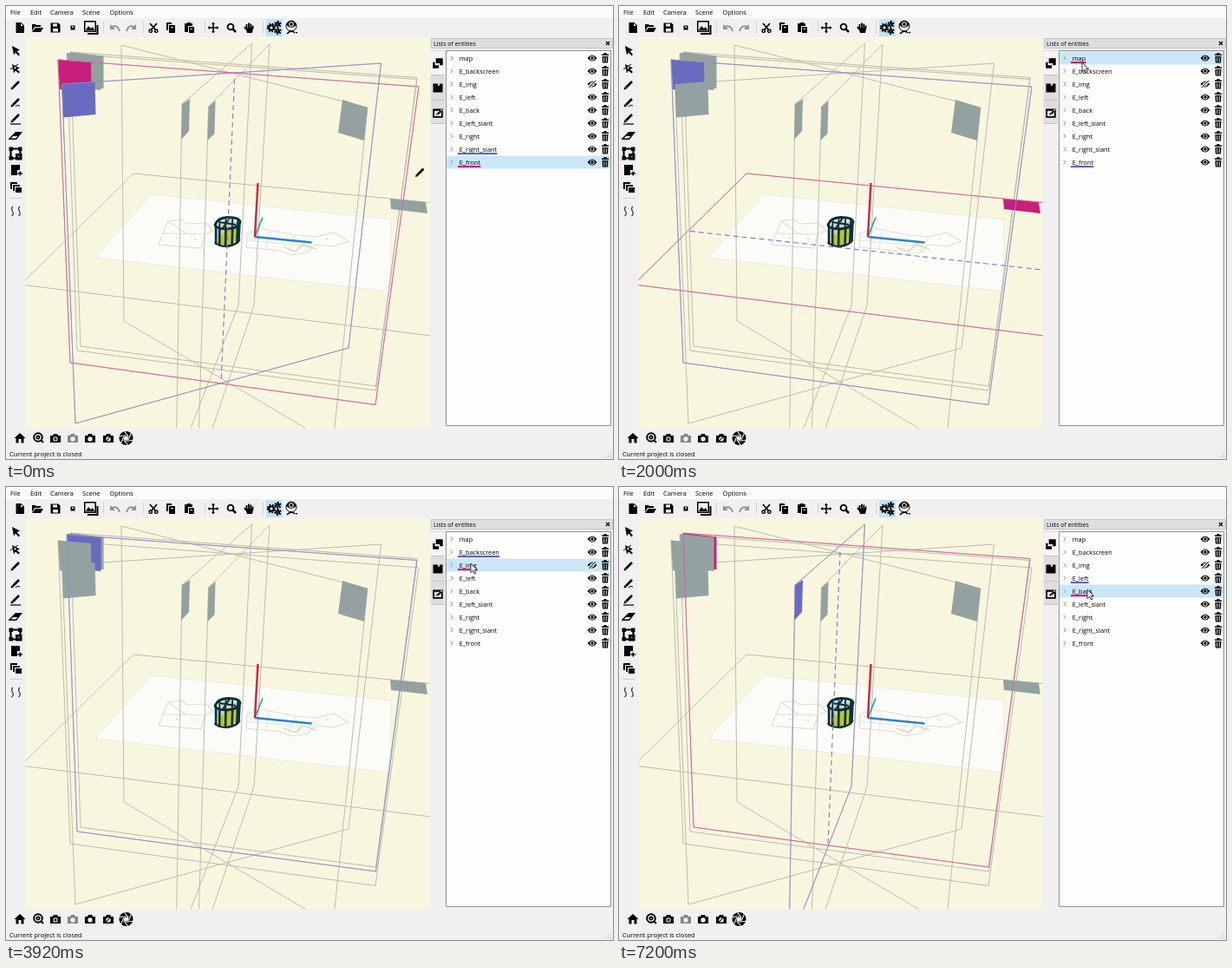
Write an HTML page with a canvas that moves like this. It is 700 by 522 pixels and loops after 7240 ms.

```html
<!DOCTYPE html>
<html lang="en">
<head>
<meta charset="utf-8">
<title>Lists of entities</title>
<style>
html, body { margin: 0; width: 100%; height: 100%; overflow: hidden; background: #f0f0f0; }
canvas { display: block; width: 700px; height: 522px; }
</style>
</head>
<body>
<canvas id="stage" width="700" height="522"></canvas>
<script>
const ctx = document.getElementById('stage').getContext('2d');
const LOOP = 7240;
const PINK = '#c71f7c', PURPLE = '#6a6abf', GREY = '#93a2a0', INK = '#000';
const ROWS = ['map', 'E_backscreen', 'E_img', 'E_left', 'E_back', 'E_left_slant', 'E_right', 'E_right_slant', 'E_front'];

// Outline and corner flag of each plane, back to front
const PLANES = {
  map: { edge: 'M17 321L147 193L530 230.5V385Z', flag: 'M443 222L484 226L486 239L444 234Z' },
  E_left_slant: { edge: 'M133 45L417 117L377 505L136 363Z', flag: 'M388 108L417 117L413 155L383 146Z' },
  E_left: { edge: 'M283.5 43L268 345L196 530L203 113Z', flag: 'M203 113L212 107L211 144L202 154Z' },
  E_right: { edge: 'M304 44L286 345L221 537L233.5 116Z', flag: 'M233.5 116L241.5 109L240.5 147L232.5 155Z' },
  E_back: { edge: 'M74 53L474 82.500L426.500 438L86 392Z', flag: 'M74 53L112.500 57.500L112.500 95L76 92Z' },
  E_backscreen: { edge: 'M70 55L474 84.500L426.500 443L82 397Z', flag: 'M70 54L109.500 58L109.500 97L73 94Z' },
  E_front: { edge: 'M60 62L476 93L426 459.500L74 411Z', flag: 'M60 61.500L98 65L98.500 100L62 96Z' },
  E_right_slant: { edge: 'M64.500 90L432.500 66L395 394L80 481Z', flag: 'M64.500 90L102.500 87L103.500 125L66 128.500Z' }
};

// start time, selected entity, previous one, their intersection
const STATES = [
  [0, 'E_front', 'E_right_slant', 'M263.500 84L248 434'],
  [1700, 'map', 'E_front', 'M82 259.500L488 304'],
  [2720, 'E_backscreen', 'map', 'M88 252L488 294'],
  [3760, 'E_img', 'E_backscreen', ''],
  [5040, 'E_left', 'E_img', 'M251 73L237 420'],
  [6160, 'E_back', 'E_left', 'M255 75L241 413']
];

// time, x, y of the pointer tip
const MOVES = [
  [0, 472, 197], [120, 472, 197], [520, 521, 114], [1240, 534, 65], [2250, 534, 65],
  [2480, 533, 74], [3160, 533, 75], [3440, 536, 88], [4800, 536, 88],
  [5000, 537, 103], [5080, 537, 104], [5280, 540, 118], [LOOP, 540, 118]
];

function rect(x, y, w, h, color) {
  ctx.fillStyle = color;
  ctx.fillRect(x, y, w, h);
}
function fill(d, color = INK) {
  ctx.fillStyle = color;
  ctx.fill(new Path2D(d), 'evenodd');
}
function line(d, color = INK, width = 1, dash = []) {
  ctx.strokeStyle = color;
  ctx.lineWidth = width;
  ctx.setLineDash(dash);
  ctx.stroke(new Path2D(d));
  ctx.setLineDash([]);
}
function text(s, x, y, size = 7.4) {
  ctx.font = `500 ${size}px "Open Sans", "Noto Sans", sans-serif`;
  ctx.fillStyle = INK;
  ctx.fillText(s, x, y);
}
function at(x, y, draw, scale = 1) {
  ctx.save();
  ctx.translate(x, y);
  ctx.scale(scale, scale);
  draw();
  ctx.restore();
}
const disc = (r, x = 0, y = 0) => `M${x - r} ${y}a${r} ${r} 0 1 0 ${2 * r} 0a${r} ${r} 0 1 0 ${-2 * r} 0Z`;
const icon = (x, y, d, color, scale) => at(x, y, () => fill(d, color), scale);
const stroke = (x, y, d, w, color) => at(x, y, () => line(d, color, w));

const EYE = 'M-5.500 0Q0-7 5.500 0Q0 7-5.500 0Z' + disc(2.6) + disc(1.7);
const CAMERA = 'M-6-3H-3L-2-5H2L3-3H6V5H-6Z' + disc(2.7, 0, 1);
const POINTER = 'M0 0V10.500L2.500 8.300L4.300 12L6 11.200L4.300 7.600H7.500Z';

function grip(x, y) {
  for (let i = 0; i < 7; i++) rect(x, y + i * 2, 1, 1, '#b5b5b5');
}
function pencil(x, y) {
  stroke(x, y, 'M-3 3L4-4', 2.6);
  icon(x, y, 'M-5.500 5.500L-4.500 2L-2 4.500Z');
}
function gear(x, y, r) {
  at(x, y, () => {
    line(disc(r), INK, 2.1);
    line(disc(r + 1.6), INK, 1.9, [1.8, 1.6]);
  });
}

function topBar() {
  ['File', 'Edit', 'Camera', 'Scene', 'Options'].forEach((s, i) => text(s, [5, 28, 51, 88, 119.5][i], 9.6));
  icon(16, 25, 'M-4.500-6H1.500L5-2.500V6H-4.500ZM1-5V-2H4Z');
  icon(36, 25, 'M-6-4H-2L-1-3H4V-1H-3L-6 4ZM-2 0H7L4 5H-6Z');
  icon(57, 25, 'M-5.500-5.500H3.500L5.500-3.500V5.500H-5.500ZM-3-4.500H2V-1.500H-3ZM-3 1H3V4.500H-3Z');
  icon(77, 25, 'M-2.500-2.500H2.500V2.500H-2.500ZM-1-1.500H1V0H-1Z');
  icon(97, 25, 'M-7-8H7V5H-7ZM-5.500-6.500H5.500V3.500H-5.500ZM-5 3L-2-2L1 1L3-1L5 3Z');
  line('M94 32H105.500V22', INK, 2);
  grip(112, 18);
  for (const [x, s] of [[126, 1], [144, -1]]) at(x, 25, () => {
    ctx.scale(s, 1);
    line('M-4-1Q3-4 5 4', '#929292', 2);
    fill('M-6-4V2H0Z', '#929292');
  });
  grip(158, 18);
  stroke(170, 25, 'M-4-5L3 3M4-5L-3 3', 1.7);
  stroke(170, 25, disc(1.7, -3.3, 3.7) + disc(1.7, 3.3, 3.7), 1.4);
  icon(190, 25, 'M-5-6H1V-4H-3V3H-5ZM-2-3H5V6H-2ZM0-1H3V0H0Z');
  icon(211, 25, 'M-5-5H-2V-6H2V-5H4V-2H-1V5H-5ZM0-1H6V6H0ZM1.500 1H4V2H1.500Z');
  grip(229, 18);
  stroke(239, 25, 'M-5 0H5M0-5V5', 1.6);
  icon(239, 25, 'M0-6.500L2-4H-2ZM0 6.500L2 4H-2ZM-6.500 0L-4-2V2ZM6.500 0L4-2V2Z');
  stroke(259, 24, disc(3.4), 1.9);
  stroke(259, 24, 'M2.500 2.500L6 6', 2.5);
  stroke(280, 25, 'M-2.500 1V-4M0 0V-5.500M2.300 0V-4.500M4.500 1V-2.500M-3 2L-5-1', 1.8);
  icon(280, 25, 'M-4 0H5.300L4 6H-2Z');
  grip(296, 18);
  rect(300, 15, 19, 20, '#c4e1f3');
  gear(306, 25, 2.7);
  gear(313.5, 21, 1.6);
  gear(313.5, 29, 1.6);
  stroke(329, 23, disc(6), 1);
  icon(329, 21, EYE, INK, 1.1);
  line('M324 32Q329 27 333 31', INK, 1.7);
  icon(335, 31, 'M-1.500-1H1.500L0 1Z');
}

function sideBar() {
  icon(7, 46, 'M0 0L9 4.500L5.500 6L9 10L7.500 11.500L4 7.500L2 10.500Z');
  icon(7, 67, 'M0 0L9 4.500L5.500 6L9 9L7.500 10.500L4 7.500L2 10.500ZM2 2L5 4L3 6Z');
  line('M5 73L14 67', INK, 1);
  pencil(11, 91);
  pencil(11, 111);
  line('M11 116Q13 113 16 115', INK, 1);
  pencil(11, 129);
  line('M5 136H17', INK, 1.2);
  icon(11, 150, 'M-8 3L0-5H8L1 4H-8ZM-5.500 2.500H0L2.500 0H-3Z');
  stroke(11, 170, 'M-5.500-5.500H5.500V5.500H-5.500Z', 2.2, INK);
  icon(11, 170, 'M-7.500-7.500H-3V-3H-7.500ZM3-7.500H7.500V-3H3ZM-7.500 3H-3V7.500H-7.500ZM0 0H7.500V7.500H0ZM3 3H5V4H3Z');
  icon(11, 189, 'M-5-6H5V0H2V6H-5Z');
  stroke(11, 189, 'M2.500 4H8M5.300 1.500V6.500', 1.5);
  icon(11, 209, 'M-6-6H2V-4H-4V2H-6ZM-3-3H5V-1H-1V4H-3ZM0 0H7V6H0Z');
  for (let i = 0; i < 7; i++) rect(5 + i * 2, 221, 1, 1, '#aaa');
  line('M8 231Q5.500 233 7.500 236.500T6.500 242M16 231Q13.500 233 15.500 236.500T14.500 242', '#333', 1.2);
}

function bottomBar() {
  icon(16, 498, 'M0-6L6.500 0H4.500V5.500H1.500V1H-1.500V5.500H-4.500V0H-6.500Z');
  stroke(37, 497, disc(4.8), 2);
  stroke(37, 497, 'M3 3L6 6', 2);
  stroke(37, 497, disc(1.7), 1.7);
  [57, 77, 97, 118].forEach(x => icon(x, 498, CAMERA, x === 77 ? '#858585' : INK));
  line('M55 499H59M57 497V501M116 501L120 496', INK, 1.1);
  at(138.5, 498, () => {
    fill(disc(8));
    for (let i = 0; i < 6; i++) {
      line('M2.800-1.600L-2-8', '#f0f0f0', 1.2);
      ctx.rotate(Math.PI / 3);
    }
    fill(disc(2.6), '#f0f0f0');
  });
  text('Current project is closed', 4, 518.6);
  for (let i = 0; i < 3; i++) for (let j = 0; j <= i; j++) rect(697 - j * 2.5, 514 + i * 2.5, 1, 1, '#aaa');
}

function paper() {
  const edge = 'M167 217L444 246L443 329L103 290Z';
  fill(edge, '#fbfbf8');
  line(edge, '#dcddd6', 0.8, [3, 2]);
  const faint = '#dfdfd3';
  line('M181 262L187 248L202 246L209 251L231 250L239 259L229 263L225 279L176 275L181 262L227 263M187 248L207 262', faint, 1.2);
  line('M278 262L293 256L334 264L357 266L378 261L395 271L378 277L356 275L348 284L329 287L318 282L277 278Z', faint, 1.2);
  line('M303 260L300 280M334 265L326 284M357 266L346 282M277 270L340 276', '#e6e6dc', 1);
  line('M320 278L334 283L342 275L358 280', '#d2d0bd', 1.3);
  [[196, 267], [217, 268], [290, 268], [313, 269], [369, 268]].forEach(([x, y]) => rect(x, y, 2, 1, '#b5cbd5'));
}

function barrel() {
  const dark = '#0b2f3d';
  fill('M242 254L256 245L269 250L269 269L256 277L242 274Z', '#c9d2bd');
  fill('M247 265L257 256L269 253L268 270L257 276L247 275Z', '#b9c52e');
  for (let i = 0; i < 11; i++) {
    const a = i * Math.PI * 2 / 11, c = Math.cos(a), s = Math.sin(a);
    const far = s < 0;
    line(`M${255.5 + 14 * c} ${250 - 1.5 * c + 5 * s}L${255 + 13.5 * c} ${far ? 259 + 3 * s : 271.5 - 2 * c + 4.5 * s}`, dark, far ? 1.8 : 2.6);
  }
  line('M241 252Q244 244 256 243.500Q269 243.500 270 249Q268 256 255 257Q242 257 241 252Z', dark, 2.8);
  line('M241 272Q244 277 255 277Q267 275 269.500 269', dark, 2.4);
  line('M246 249L265 252M258 244L250 256', dark, 2);
}

function scene([, now, before, cross]) {
  ctx.save();
  ctx.beginPath();
  ctx.rect(22.5, 36, 466, 450.5);
  ctx.clip();
  rect(22, 36, 467, 451, '#f9f6e0');
  paper();
  const lit = id => id === now ? PINK : id === before ? PURPLE : null;
  const ids = Object.keys(PLANES);
  ids.forEach(id => line(PLANES[id].edge, '#bcbcb2', 1));
  barrel();
  line('M287 266L296 243.500', '#35a79c', 1.8);
  line('M287 266L352.500 272.500', '#2a86c4', 2.5);
  line('M287 266L290.500 204', '#cb2b3e', 2.5);
  ids.forEach(id => fill(PLANES[id].flag, lit(id) || GREY));
  [before, now].forEach(id => {
    if (PLANES[id]) line(PLANES[id].edge, id === now ? '#de5c9e' : '#8f8dcc', 0.9);
  });
  if (cross) line(cross, '#7c7abf', 1.1, [6, 4]);
  ctx.restore();
}

function panel([, now, before], hover, t) {
  rect(490, 37, 210, 12, '#dedede');
  line('M490.500 37.500H699.500V48.500H490.500Z', '#c6c6c6');
  text('Lists of entities', 493, 46, 7);
  line('M692 41L696 45M696 41L692 45', INK, 1.2);

  rect(490, 51, 16, 84, '#dedede');
  rect(490, 52, 17, 27, '#f4f4f4');
  line('M490 79.500H506M490 108.500H506M490 135.500H506', '#c4c4c4');
  icon(498, 66, 'M-2-5H5V2H2V0H-2ZM-5-1H-3V2H1V5H-5Z', INK, 1.15);
  icon(498, 94, 'M-5-4H0V-2H2V-4H5V5H-5Z', INK, 1.1);
  icon(498, 123, 'M-5-4H5V5H-5ZM-3.500-2H3.500V3.500H-3.500ZM-2 2L2-2L5-5L3 0L0 2Z', INK, 1.15);

  rect(507, 51, 191, 433, '#fdfdfb');
  line('M507.500 51.500H697.500V483.500H507.500Z', '#8d9298');
  ROWS.forEach((name, i) => {
    const y = 60 + 15 * i;
    if (name === now) rect(508, y - 7.5, 189, 15, '#cbe7f7');
    else if (i === hover) rect(508, y - 7.5, 189, 15, '#e5f3fb');
    stroke(514, y, 'M-1.500-2.500L1 0L-1.500 2.500', 1, name === 'E_back' && t > 560 ? '#5cc0e6' : '#999');
    text(name, 522.7, y + 2.6);
    if (name === now || name === before) {
      rect(521, y + 4, ctx.measureText(name).width + 2, 2.2, name === now ? PINK : '#6462c8');
    }
    icon(676, y, EYE);
    if (name === 'E_img') {
      line(`M671 ${y + 4}L681 ${y - 4}`, '#fff', 2.5);
      line(`M672 ${y + 4}L680 ${y - 4}`, INK, 1);
    }
    icon(691, y, 'M-4-4.500H-1.500V-6H1.500V-4.500H4V-3H-4ZM-3.500-2H3.500L3 5.500H-3ZM-1.700-1H-.8V4.500H-1.700ZM.8-1H1.700V4.500H.8Z');
  });
}

function pointerAt(t) {
  const i = Math.max(1, MOVES.findIndex(m => m[0] > t));
  const [t0, x0, y0] = MOVES[i - 1], [t1, x1, y1] = MOVES[i];
  const k = (t - t0) / (t1 - t0);
  return [x0 + (x1 - x0) * k, y0 + (y1 - y0) * k];
}

function render(t) {
  const state = STATES.filter(s => s[0] <= t).pop();
  const [x, y] = pointerAt(t);
  const hover = t > 560 ? Math.floor((y - 52.5) / 15) : -1;
  rect(0, 0, 700, 522, '#f0f0f0');
  rect(0, 0, 700, 14, '#fbfbfb');
  topBar();
  sideBar();
  bottomBar();
  scene(state);
  panel(state, hover, t);
  if (x < 489) pencil(x + 5.5, y - 5.5);
  else at(x, y, () => {
    fill(POINTER, '#fff');
    line(POINTER, '#222', 0.9);
  });
}

let start;
function tick(now) {
  start ??= now;
  render((now - start) % LOOP);
  requestAnimationFrame(tick);
}
render(0);
requestAnimationFrame(tick);
</script>
</body>
</html>
```
